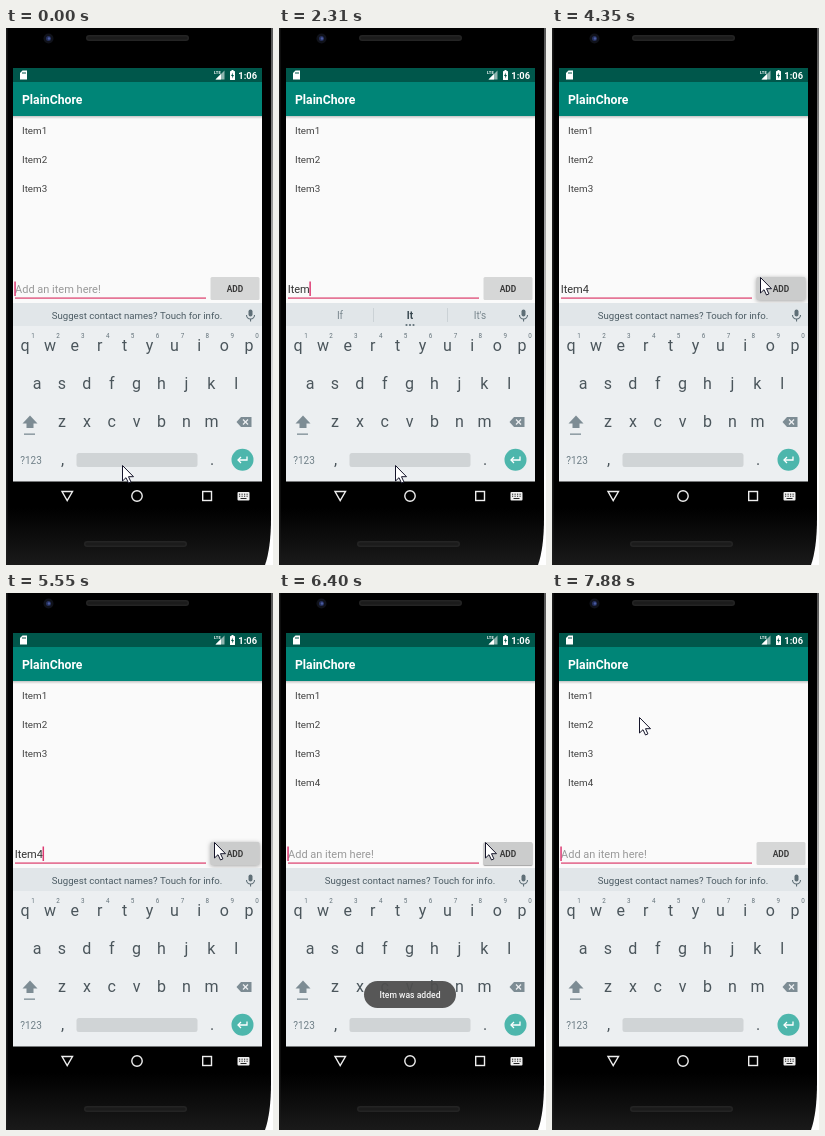
Recreate the animation shown at these times as an HTML page with a canvas. Size 267 by 537 pixels, loop 8 s.

```html
<!DOCTYPE html>
<html lang="en">
<head>
<meta charset="utf-8">
<title>To-do list demo</title>
<style>
html, body { margin: 0; width: 100%; height: 100%; overflow: hidden; background: #000; }
canvas { display: block; width: 267px; height: 537px; }
</style>
</head>
<body>
<canvas id="stage"></canvas>
<script>
const W = 267, H = 537, LOOP = 8000;
const ADDED = 5960;
const canvas = document.getElementById('stage');
const ratio = window.devicePixelRatio || 1;
canvas.width = Math.round(W * ratio);
canvas.height = Math.round(H * ratio);
const ctx = canvas.getContext('2d');
ctx.scale(ratio, ratio);

// Pointer moves: each glides to a point in a few even ticks.
const home = [117, 437];
const moves = [
  { start: 3290, step: 130, count: 4, to: [196, 259] },
  { start: 3810, step: 130, count: 3, to: [209, 249] },
  { start: 5670, step: 150, count: 5, to: [207, 249] },
  { start: 6560, step: 150, count: 4, to: [106, 166] },
  { start: 7160, step: 150, count: 3, to: [89, 132] },
  { start: 7740, step: 140, count: 2, to: [88, 124] }
];
const caretGaps = [[150, 720], [3020, 3290], [4350, 5550], [6560, 7010], [7460, 7880]];

const within = (t, from, to) => t >= from && t < to;
const smooth = p => p * p * (3 - 2 * p);

function ticks(t, start, step, count) {
  return Math.max(0, Math.min(count, Math.floor((t - start) / step) + 1));
}

function ramp(t, start, step, count) {
  return ticks(t, start, step, count) / count;
}

function pointerAt(t) {
  return moves.reduce((pos, { start, step, count, to }) => {
    const p = smooth(ramp(t, start, step, count));
    return pos.map((v, i) => v + (to[i] - v) * p);
  }, home);
}

function entryAt(t) {
  if (t >= ADDED) return '';
  if (t >= 3290) return 'Item4';
  if (within(t, 720, 1290)) return 'i';
  return 'Item'.slice(0, ticks(t, 1880, 143, 4));
}

function wordsAt(t) {
  if (!within(t, 860, 3430)) return null;
  if (t < 2170) return ['I', 'in', 'is'];
  return t < 2460 ? ['If', 'It', "It's"] : ['Ite', 'Item', 'Items'];
}

function rect(x, y, w, h, color) {
  ctx.fillStyle = color;
  ctx.fillRect(x, y, w, h);
}

function fade(y0, y1, from, to) {
  const g = ctx.createLinearGradient(0, y0, 0, y1);
  g.addColorStop(0, from);
  g.addColorStop(1, to);
  return g;
}

function pill(x, y, w, h, r, color) {
  ctx.fillStyle = color;
  ctx.beginPath();
  ctx.roundRect(x, y, w, h, r);
  ctx.fill();
}

function disc(x, y, r, color) {
  ctx.fillStyle = color;
  ctx.beginPath();
  ctx.arc(x, y, r, 0, Math.PI * 2);
  ctx.fill();
}

function trace(points, closed) {
  ctx.beginPath();
  points.forEach(([x, y]) => ctx.lineTo(x, y));
  if (closed) ctx.closePath();
}

function shape(points, color) {
  trace(points, true);
  ctx.fillStyle = color;
  ctx.fill();
}

function line(points, color, width = 1, closed = false) {
  trace(points, closed);
  ctx.strokeStyle = color;
  ctx.lineWidth = width;
  ctx.stroke();
}

function text(str, x, y, size, color, align = 'left', weight = 400) {
  ctx.font = `${weight} ${size}px Roboto, sans-serif`;
  ctx.textAlign = align;
  ctx.fillStyle = color;
  ctx.fillText(str, x, y);
  return ctx.measureText(str).width;
}

function drawPhone() {
  rect(0, 0, W, H, fade(0, 450, '#555', '#fff'));
  ctx.beginPath();
  ctx.moveTo(0, 0);
  ctx.lineTo(265, 0);
  ctx.lineTo(265, 490);
  ctx.quadraticCurveTo(265, 520, 259, H);
  ctx.lineTo(0, H);
  ctx.fillStyle = fade(480, H, '#000', '#1a1a1a');
  ctx.fill();
  rect(0, 0, 1.5, H, '#1c1c1c');
  disc(42.5, 10.5, 5, '#10121a');
  disc(42.5, 10.5, 2.5, '#26315e');
  disc(43, 10.5, 1.2, '#4b5ba0');
  for (const [x, y] of [[80, 7], [78, 513]]) {
    pill(x, y, 103, 6, 3, '#242424');
    pill(x + 1.5, y + 1.5, 100, 3, 1.5, '#1b1b1b');
  }
}

function drawBars() {
  rect(7, 40, 249, 14, '#00574b');
  rect(7, 54, 249, 34, '#008577');
  text('PlainChore', 16, 76, 12.2, '#fff', 'left', 700);
  shape([[16.5, 42.5], [21, 42.5], [21, 51.5], [14, 51.5], [14, 45]], '#fff');
  for (const x of [16.5, 18.5]) rect(x, 44, 1, 2, '#00574b');
  shape([[218.5, 42.5], [218.5, 51.5], [209.5, 51.5]], '#8fb5b0');
  shape([[215, 46], [215, 51.5], [209.5, 51.5]], '#fff');
  text('LTE', 208, 46, 4.2, '#fff', 'left', 700);
  rect(225.5, 42, 2, 1, '#fff');
  pill(224, 43, 5, 9, 0.5, '#fff');
  shape([[227, 44.5], [225, 48], [226.3, 48], [226, 50.5], [228, 47], [226.7, 47]], '#00574b');
  text('1:06', 251, 51, 9.3, '#fff', 'right', 700);
  rect(7, 88, 249, 187, '#fafafa');
  rect(7, 88, 249, 3, fade(88, 91, '#c4c4c4', '#fafafa'));
}

function drawButton(t) {
  const pressed = within(t, 4220, 6560);
  const raised = within(t, 4350, 5820);
  ctx.save();
  if (pressed) {
    ctx.shadowColor = 'rgba(0,0,0,.35)';
    ctx.shadowBlur = (raised ? 4 : 1) * ratio;
    ctx.shadowOffsetY = ratio;
  }
  pill(204.5, 249, 49, 23, 1.5, pressed ? '#cbcccc' : '#d6d7d7');
  ctx.restore();
  text('ADD', 229, 263.5, 8.4, '#3a3a3a', 'center', 700);
}

function drawForm(t) {
  const count = t < ADDED ? 3 : 4;
  for (let i = 0; i < count; i++) text('Item' + (i + 1), 16, 106 + 29 * i, 9.8, '#424242');
  const entry = entryAt(t);
  const width = text(entry, 8.7, 265, 11, '#333');
  if (!entry) text('Add an item here!', 9, 265, 11, '#999');
  const hidden = caretGaps.some(([from, to]) => within(t, from, to));
  if (!hidden) rect(8.3 + width, 253.5, 1.5, 14.5, '#dd3a72');
  rect(9, 269.4, 191, 1.4, '#e0567f');
  drawButton(t);
}

function drawSuggestions(words) {
  rect(7, 275, 249, 23, '#e1e6e9');
  if (words) {
    words.forEach((word, i) => text(word, 61 + 70 * i, 291, 10,
      i === 1 ? '#37474f' : '#78868d', 'center', i === 1 ? 700 : 400));
    for (const x of [94, 168]) rect(x, 280, 1, 14, '#cbd2d6');
    for (const x of [127.5, 131, 134.5]) disc(x, 297, 1.1, '#607078');
  } else {
    text('Suggest contact names? Touch for info.', 131, 291, 9.65, '#4b5b63', 'center');
  }
  const grey = '#5f6f77';
  pill(242.5, 281.5, 4, 7, 2, grey);
  ctx.beginPath();
  ctx.arc(244.5, 287, 4, 0, Math.PI);
  ctx.strokeStyle = grey;
  ctx.lineWidth = 1.1;
  ctx.stroke();
  rect(244, 291, 1.1, 2.5, grey);
}

function drawKeys() {
  rect(7, 298, 249, 155.5, '#eceff1');
  const ink = '#4b565c', grey = '#7d8c94', pitch = 24.9;
  const rows = [['qwertyuiop', 19], ['asdfghjkl', 31], ['zxcvbnm', 56]];
  rows.forEach(([letters, x], row) => {
    [...letters].forEach((ch, i) => text(ch, x + pitch * i, 323 + 38 * row, 16, ink, 'center'));
  });
  for (let i = 0; i < 10; i++) {
    text((i + 1) % 10, 27 + pitch * i, 309.5, 6.3, '#64737b', 'center');
  }

  shape([[24, 387.5], [31.5, 395.5], [27.5, 395.5], [27.5, 400], [20.5, 400],
    [20.5, 395.5], [16.5, 395.5]], grey);
  rect(18, 405.5, 11, 1.3, grey);
  shape([[235, 389], [245.5, 389], [245.5, 399], [235, 399], [230.5, 394]], grey);
  line([[237, 391.5], [242, 396.5]], '#eceff1', 1.2);
  line([[242, 391.5], [237, 396.5]], '#eceff1', 1.2);

  text('?123', 25, 435.5, 10, '#6f7f87', 'center');
  text(',', 56.5, 437, 16, ink, 'center');
  text('.', 206, 437, 16, ink, 'center');
  pill(70.5, 425, 121, 14, 2.5, '#d0d4d6');
  disc(236.5, 431.7, 11, '#4db6ac');
  line([[241, 428.5], [241, 432], [232.5, 432]], '#fff', 1.3);
  line([[235, 429], [232, 432], [235, 435]], '#fff', 1.3);
}

function drawNav() {
  line([[56, 463.5], [66.5, 463.5], [61.2, 472.5]], '#eee', 1.4, true);
  ctx.beginPath();
  ctx.arc(131, 468, 5.2, 0, Math.PI * 2);
  ctx.stroke();
  ctx.strokeRect(196.7, 463.5, 8.8, 9);
  pill(231.5, 464, 12, 8.5, 1, '#eee');
  for (let i = 0; i < 8; i++) {
    rect(233 + (i % 4) * 2.5, 465.7 + Math.floor(i / 4) * 2, 1.2, 1, '#222');
  }
  rect(234.5, 470, 6, 1, '#222');
}

function drawToast(t) {
  ctx.globalAlpha = ramp(t, ADDED, 150, 3) * (1 - ramp(t, 6710, 150, 3));
  pill(85, 388, 92, 27, 13.5, 'rgba(78,78,78,.94)');
  text('Item was added', 131, 405, 8.6, '#f5f5f5', 'center', 500);
  ctx.globalAlpha = 1;
}

function drawPointer([x, y]) {
  ctx.save();
  ctx.translate(x - 0.5, y + 0.5);
  const arrow = [[0, 0], [0, 15.5], [3.5, 12.2], [6, 17.5], [8.4, 16.4], [6, 11.2], [11, 11.2]];
  shape(arrow, '#fff');
  line(arrow, '#15152a', 1, true);
  ctx.restore();
}

function render(t) {
  drawPhone();
  drawBars();
  drawForm(t);
  drawSuggestions(wordsAt(t));
  drawKeys();
  drawNav();
  drawToast(t);
  drawPointer(pointerAt(t));
}

const begin = performance.now();
function tick() {
  render((performance.now() - begin) % LOOP);
  requestAnimationFrame(tick);
}
tick();
</script>
</body>
</html>
```
